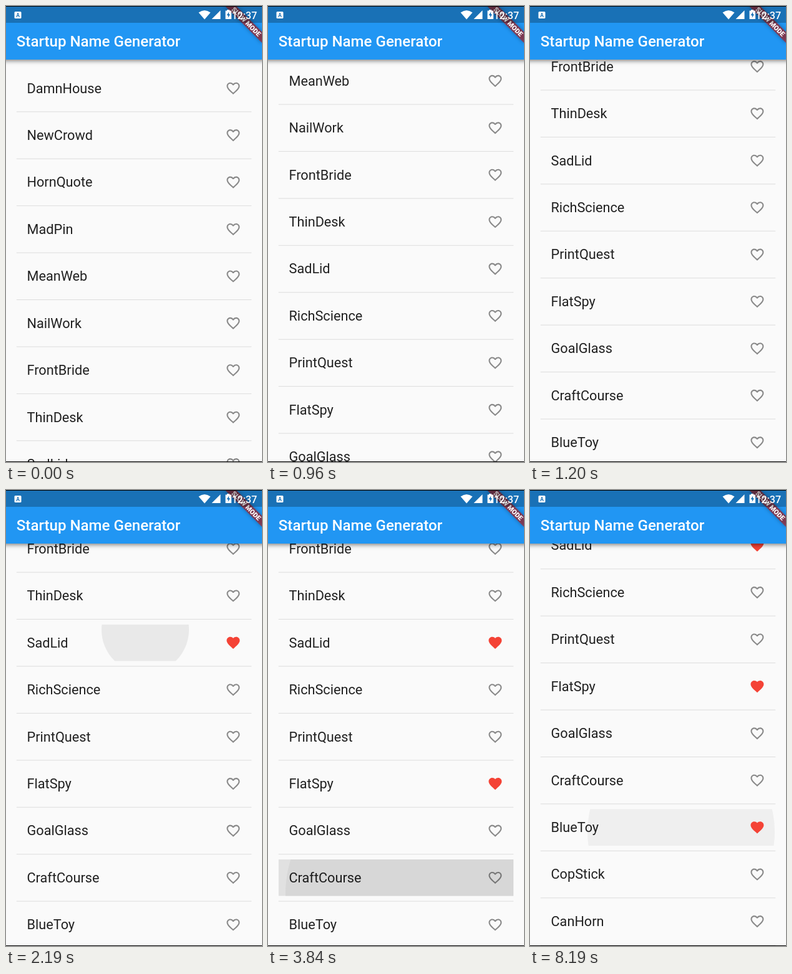
An HTML page with a canvas for the animation above (8220 ms loop, 410 by 732 pixels).

```html
<!DOCTYPE html>
<html lang="en">
<head>
<meta charset="utf-8">
<title>Startup Name Generator</title>
<style>
  html, body { margin: 0; width: 100%; height: 100%; overflow: hidden; background: #fafafa; }
  canvas { display: block; }
</style>
</head>
<body>
<canvas id="stage" width="410" height="732"></canvas>
<script>
const ctx = document.getElementById('stage').getContext('2d');
const LOOP = 8220, STEP = 30;
const DP = 1.0476;               // pixels per layout unit
const PITCH = 75.43, FIRST_ROW = 132.1, CELL = 58.7;
const LEFT = 16.8, RIGHT = 393.2;
const BAR = '#2196f3', STATUS = '#1971b6';

const names = ['DamnHouse', 'NewCrowd', 'HornQuote', 'MadPin', 'MeanWeb', 'NailWork',
  'FrontBride', 'ThinDesk', 'SadLid', 'RichScience', 'PrintQuest', 'FlatSpy',
  'GoalGlass', 'CraftCourse', 'BlueToy', 'CopStick', 'CanHorn'];
const savedAt = { SadLid: 2190, FlatSpy: 2610, BlueToy: 8130 };

const outer = 'M12 21.35l-1.45-1.32C5.4 15.36 2 12.28 2 8.5 2 5.42 4.42 3 7.5 3c1.74 0 3.41.81 4.5 2.09C13.09 3.81 14.76 3 16.5 3 19.58 3 22 5.42 22 8.5c0 3.78-3.4 6.86-8.55 11.54L12 21.35z';
const inner = 'M12.1 18.55l-.1.1-.1-.1C7.14 14.24 4 11.39 4 8.5 4 6.5 5.5 5 7.5 5c1.54 0 3.04.99 3.57 2.36h1.87C13.46 5.99 14.96 5 16.5 5c2 0 3.5 1.5 3.5 3.5 0 2.89-3.14 5.74-7.9 10.05z';
const fullHeart = new Path2D(outer);
const hollowHeart = new Path2D(outer + inner);

const progress = (t, from, to) => Math.min(1, Math.max(0, (t - from) / (to - from)));

function scrollAt(t) {
  if (t >= 7980) return 646.5;
  const fling = 1 - (1 - progress(t, 795, 1200)) ** 1.97;
  return 487.4 * fling + 2.9 * progress(t, 1470, 1560);
}

function text(str, x, y, font, color, align = 'left') {
  ctx.font = font + ' Roboto, sans-serif';
  ctx.fillStyle = color;
  ctx.textAlign = align;
  ctx.fillText(str, x, y);
}

function rect(x, y, w, h, color) {
  ctx.fillStyle = color;
  ctx.fillRect(x, y, w, h);
}

function polygon(color, ...points) {
  ctx.fillStyle = color;
  ctx.beginPath();
  for (const [x, y] of points) ctx.lineTo(x, y);
  ctx.fill();
}

function heart(y, saved) {
  ctx.save();
  ctx.translate(363.9, y);
  ctx.scale(DP, DP);
  ctx.translate(-12, -12);
  ctx.fillStyle = saved ? '#f44336' : 'rgba(0,0,0,.45)';
  ctx.fill(saved ? fullHeart : hollowHeart, 'evenodd');
  ctx.restore();
}

// Touch feedback inside one cell: a flat highlight and a growing circle.
function touch(y, x, dy, radius, alpha, highlight = 0) {
  ctx.save();
  ctx.beginPath();
  ctx.rect(LEFT, y - CELL / 2, RIGHT - LEFT, CELL);
  ctx.clip();
  rect(LEFT, y - CELL / 2, RIGHT - LEFT, CELL, `rgba(188,188,188,${highlight})`);
  ctx.fillStyle = `rgba(200,200,200,${alpha})`;
  ctx.beginPath();
  ctx.arc(x, y + dy, radius, 0, 2 * Math.PI);
  ctx.fill();
  ctx.restore();
}

function feedback(name, y, t) {
  if (name === 'SadLid' && t >= 2190 && t < 3030) {
    touch(y, 223, -21, 70, .34 * (1 - progress(t, 2610, 3030)));
  } else if (name === 'CraftCourse' && t >= 3240 && t < 8130) {
    const radius = t < 7980 ? 195 * progress(t, 3210, 3840) : 420;
    touch(y, 223, 27, radius, .4, .4 * progress(t, 3210, 3450));
  } else if (name === 'BlueToy' && t >= 8130) {
    const p = progress(t, 8130, 8190);
    touch(y, 242, 7, 100 + 50 * p, .3 - .08 * p);
  }
}

function list(t) {
  const scroll = scrollAt(t);
  names.forEach((name, i) => {
    const y = FIRST_ROW + i * PITCH - scroll;
    if (y < 30 || y > 770) return;
    feedback(name, y, t);
    text(name, 33.5, y + 7.4, '21.7px', 'rgba(0,0,0,.87)');
    heart(y, t >= savedAt[name]);
    rect(LEFT, y + PITCH / 2 - .5, RIGHT - LEFT, 1, 'rgba(0,0,0,.12)');
  });
}

function ribbon() {
  ctx.save();
  ctx.translate(410, 0);
  ctx.rotate(Math.PI / 4);
  ctx.scale(DP, DP);
  ctx.shadowColor = 'rgba(0,0,0,.5)';
  ctx.shadowBlur = 6;
  rect(-40, 28, 80, 12, 'rgba(183,28,28,.63)');
  ctx.shadowBlur = 0;
  text('SLOW MODE', 0, 37.7, '900 10.2px', '#fff', 'center');
  ctx.restore();
}

function statusIcons() {
  const white = '#fff';
  ctx.fillStyle = white;
  ctx.beginPath();
  ctx.roundRect(13.5, 9, 11, 11, 1.5);
  ctx.fill();
  text('A', 19, 17.6, '700 8.5px', STATUS, 'center');

  ctx.fillStyle = white;
  ctx.beginPath();
  ctx.moveTo(308.5, 10.5);
  ctx.quadraticCurveTo(318, 3.5, 327.5, 10.5);
  ctx.lineTo(318, 21.5);
  ctx.fill();

  polygon(white, [343.5, 7], [343.5, 21], [329.5, 21]);

  rect(354, 6, 4, 2, white);
  rect(351.5, 7.5, 9.5, 13.5, white);
  polygon(STATUS, [357, 9.5], [353.5, 15], [355.7, 15], [355.7, 19], [359, 13.3], [357, 13.3]);

  text('12:37', 402, 21, '500 16px', white, 'right');
}

function appBar() {
  ctx.save();
  ctx.shadowColor = 'rgba(0,0,0,.5)';
  ctx.shadowBlur = 7;
  ctx.shadowOffsetY = 2;
  rect(-10, 0, 430, 86, BAR);
  ctx.restore();
  text('Startup Name Generator', 16.8, 64.6, '500 24.1px', '#fff');
  ribbon();
  rect(0, 0, 410, 27, 'rgba(0,0,0,.25)');
  statusIcons();
}

function draw(now) {
  const t = Math.floor(now % LOOP / STEP) * STEP;
  rect(0, 0, 410, 732, '#fafafa');
  list(t);
  appBar();
  rect(0, 0, 410, 1, '#000');
  rect(0, 731, 410, 1, '#000');
}

function tick() {
  draw(performance.now());
  requestAnimationFrame(tick);
}
tick();
</script>
</body>
</html>
```
